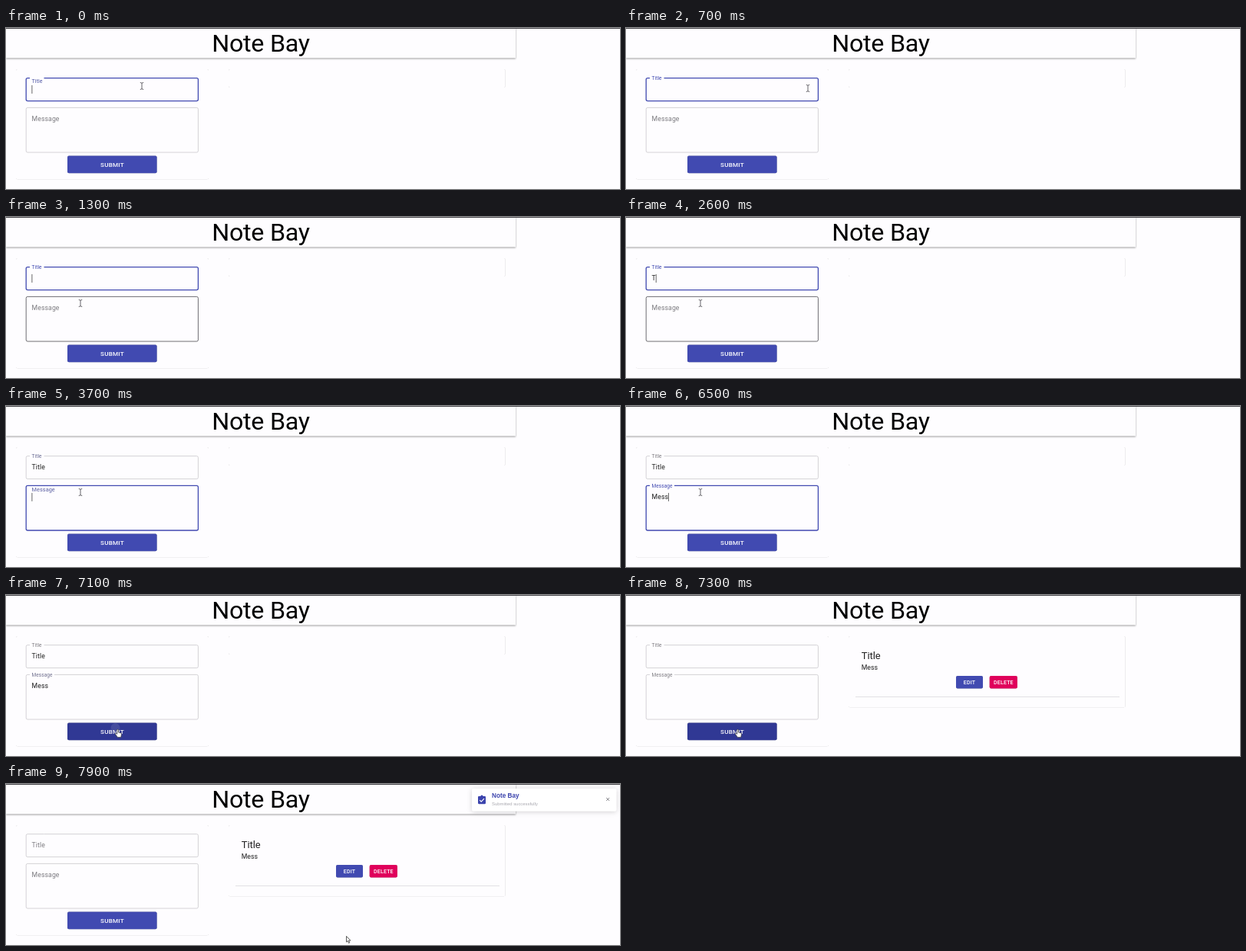
These frames come from a looping animation (800x211 px, 8000 ms). An HTML page:

```html
<!DOCTYPE html>
<html lang="en">
<head>
<meta charset="utf-8">
<title>Note Bay</title>
<style>
  html, body { margin: 0; width: 100%; height: 100%; overflow: hidden; background: #fefdff; }
  svg { display: block; width: 800px; height: 211px; }
  text { font: 8.7px Roboto, sans-serif; letter-spacing: .009em; fill: #222; white-space: pre; }
  .heading { font-size: 32.2px; letter-spacing: -.008em; fill: #000; text-anchor: middle; }
  .button { font-weight: 500; letter-spacing: .0286em; fill: #fff; text-anchor: middle; }
  .submit { font-size: 8.1px; }
  .small { font-size: 7px; }
  .post { font-size: 12.9px; letter-spacing: 0; }
  .toast-title { font: bold 8.2px "Liberation Sans", sans-serif; letter-spacing: 0; fill: #3c44ad; }
  .toast-text { font: 5.9px "Liberation Sans", sans-serif; letter-spacing: 0; fill: #aaa9b0; }
  .paper { fill: #fefdff; filter: drop-shadow(0 .7px .5px rgba(0,0,0,.28)); }
  .header { fill: #fefdff; filter: drop-shadow(0 1.4px 1.3px rgba(0,0,0,.4)); }
  .raised { filter: drop-shadow(0 .8px .7px rgba(0,0,0,.35)); }
  .toast-card { fill: #fff; filter: drop-shadow(0 1px 3px rgba(0,0,0,.17)); }
</style>
</head>
<body>
<svg viewBox="0 0 800 211">
  <rect width="800" height="211" fill="#fefdff"/>
  <rect class="header" y="-3" width="664" height="42.3"/>
  <rect width="800" height="1" fill="#47464b"/>
  <text class="heading" x="332" y="31.2">Note Bay</text>

  <rect class="paper" x="13" y="54" width="251" height="144.3" rx="2"/>
  <rect class="paper" id="listCard" x="290" y="54" width="360.6" height="24" rx="2"/>

  <g id="fields"></g>

  <rect id="submit" class="raised" x="80" y="167.6" width="116.6" height="22.6" rx="2"/>
  <circle id="ripple" cx="142.5" cy="174" fill="#fff"/>
  <text class="button submit" x="138.5" y="182">SUBMIT</text>

  <g id="post">
    <text class="post" x="306.7" y="84.2">Title</text>
    <text x="306.7" y="98.2">Mess</text>
    <rect class="raised" x="430" y="106" width="35" height="16.5" rx="2" fill="#414ab1"/>
    <text class="button small" x="447.6" y="116.6">EDIT</text>
    <rect class="raised" x="473.7" y="106" width="36.2" height="16.5" rx="2" fill="#e0005b"/>
    <text class="button small" x="491.9" y="116.6">DELETE</text>
    <path d="M299 133.5H643" stroke="#e2e1e4"/>
  </g>

  <g id="toast">
    <rect class="toast-card" x="607" y="6" width="188.5" height="29.8" rx="2"/>
    <rect x="615" y="16" width="10" height="10.2" rx="1.1" fill="#3c44ad"/>
    <circle cx="620" cy="16" r="1.6" fill="#3c44ad"/>
    <path d="M617.2 21.2l2 2 3.8-4" fill="none" stroke="#fff" stroke-width="1.1"/>
    <text class="toast-title" x="633" y="18.2">Note Bay</text>
    <text class="toast-text" x="633" y="28">Submitted successfully</text>
    <path d="M782.2 18l4 4m0-4l-4 4" stroke="#77767c" stroke-width=".9"/>
  </g>

  <g id="pointer">
    <path id="beam" d="M-2.2-4.5Q0-4.5 0-3.3Q0-4.5 2.2-4.5M0-3.5V3.5M-2.2 4.5Q0 4.5 0 3.3Q0 4.5 2.2 4.5"
      fill="none" stroke="#55545a" stroke-width=".9"/>
    <path id="arrow" d="M0 0V7.6L1.8 6 3 9 4.3 8.4 3.1 5.6H5.4Z" fill="#fff" stroke="#333" stroke-width=".8"/>
    <path id="hand" d="M-1.2-4.5q.9-.8 1.7 0V-1l3.2.9q1 .4.8 1.6L3.8 5.4H-.6L-3.8 1q.2-1.2 1.3-.6L-1.2 1.2Z"
      fill="#fff" stroke="#333" stroke-width=".7"/>
  </g>
</svg>
<script>
const LOOP = 8000, STEP = 100;
const INDIGO = [65, 74, 177], GREY = [126, 125, 130];
const $ = id => document.getElementById(id);
const clamp = v => Math.min(1, Math.max(0, v));
const easeOut = v => 1 - (1 - v) ** 2;
const ramp = (t, start, length) => easeOut(clamp((t - start) / length));
const during = (t, spans) => spans.some(([from, to]) => t >= from && t < to);
const latest = (t, steps) => steps.reduce((value, [at, next]) => t >= at ? next : value, '');
const mix = (a, b, p) => `rgb(${a.map((v, i) => v + (b[i] - v) * p)})`;
const show = (el, on) => el.style.display = on ? '' : 'none';

function add(parent, tag, attrs = {}, text = '') {
  const el = document.createElementNS('http://www.w3.org/2000/svg', tag);
  for (const key in attrs) el.setAttribute(key, attrs[key]);
  el.textContent = text;
  return parent.appendChild(el);
}

const fields = [
  { label: 'Title', top: 65.6, height: 30, base: 83.3, rise: 15, notch: 49.5,
    focus: [-100, 3620], clear: 7300,
    typing: [[2600, 'T'], [2900, 'Ti'], [3000, 'Tit'], [3200, 'Title'], [7300, '']],
    caretOn: [[0, 500], [1000, 1500], [2100, 3600]] },
  { label: 'Message', top: 104.4, height: 58.6, base: 122.2, rise: 15.4, notch: 63,
    focus: [3620, 7000], clear: 7300,
    typing: [[4400, 'M'], [4500, 'ME'], [4700, 'MES'], [4900, 'MESS'], [5100, 'MES'], [5200, 'ME'],
      [5400, 'M'], [5600, 'Me'], [6000, 'Mes'], [6100, 'Mess'], [7300, '']],
    caretOn: [[3600, 4100], [4400, 5300], [5400, 6600]] }
];

for (const f of fields) {
  const group = $('fields');
  f.border = add(group, 'path', { fill: 'none' });
  f.name = add(group, 'text', {}, f.label);
  f.value = add(group, 'text', { x: 33.6, y: f.base });
  f.caret = add(group, 'rect', { y: f.base - 8.3, width: .8, height: 11, fill: '#444' });
}

const path = [
  [0, 177, 76], [100, 180, 76], [300, 215, 78], [500, 237, 79], [700, 237, 79], [800, 234, 95],
  [900, 225, 135], [1000, 212, 171], [1100, 165, 148], [1200, 115, 120], [1300, 97, 113],
  [6500, 97, 113], [6700, 112, 138], [6900, 142, 174], [7000, 146, 181], [7300, 146, 181],
  [7500, 255, 190], [7700, 400, 203], [7800, 443.5, 199.5], [8000, 443.5, 199.5]
];

function pointerAt(t) {
  const i = path.findIndex(p => p[0] > t);
  const [t0, x0, y0] = path[i - 1], [t1, x1, y1] = path[i];
  const p = (t - t0) / (t1 - t0);
  return [x0 + (x1 - x0) * p, y0 + (y1 - y0) * p];
}

const inside = ([x, y], left, top, width, height) =>
  x > left && x < left + width && y > top && y < top + height;

function outline({ top, height, notch }, open) {
  const bottom = top + height;
  return `M${notch} ${top}H248.4a2 2 0 0 1 2 2V${bottom - 2}a2 2 0 0 1-2 2H28.2a2 2 0 0 1-2-2` +
    `V${top + 2}a2 2 0 0 1 2-2H31${open ? '' : 'Z'}`;
}

function drawField(f, t, hovered) {
  const [start, end] = f.focus;
  const focused = t >= start - 20 && t < end - 20;
  const lift = ramp(t, start, 200) - ramp(t, f.clear, 200);
  const glow = ramp(t, start, 200) - ramp(t, end, 200);
  f.border.setAttribute('d', outline(f, lift > .7));
  f.border.setAttribute('stroke', focused ? 'rgb(65,74,177)' : hovered ? '#4b4a50' : '#c9c8cc');
  f.border.setAttribute('stroke-width', focused ? 1.3 : .8);
  f.name.setAttribute('transform',
    `translate(33.6 ${f.base - f.rise * lift}) scale(${1 - .25 * lift})`);
  f.name.style.fill = mix(GREY, INDIGO, glow);
  f.value.textContent = latest(t, f.typing);
  const width = f.value.textContent ? f.value.getComputedTextLength() : 0;
  f.caret.setAttribute('x', 33.5 + width);
  show(f.caret, during(t, f.caretOn));
}

function draw(t) {
  const at = pointerAt(t);
  const hover = fields.map(f => inside(at, 26, f.top, 224, f.height));
  const onButton = inside(at, 80, 167, 117, 23);
  const onField = hover.includes(true);
  fields.forEach((f, i) => drawField(f, t, hover[i]));

  $('submit').setAttribute('fill', onButton ? '#303894' : '#414ab1');
  const spread = clamp((t - 7000) / 300);
  $('ripple').setAttribute('r', spread * 18);
  $('ripple').setAttribute('opacity', .15 * (1 - spread));

  const posted = t >= 7300;
  show($('post'), posted);
  $('listCard').setAttribute('height', posted ? 93.2 : 24);

  const entry = ramp(t, 7350, 500);
  show($('toast'), entry > 0);
  $('toast').setAttribute('transform', `translate(${200 * (1 - entry)} 0)`);

  $('pointer').setAttribute('transform', `translate(${at})`);
  show($('beam'), onField);
  show($('hand'), onButton);
  show($('arrow'), !onField && !onButton);
}

// The screen updates ten times a second.
function tick() {
  draw(Math.floor(performance.now() % LOOP / STEP) * STEP);
  requestAnimationFrame(tick);
}
tick();
</script>
</body>
</html>
```
